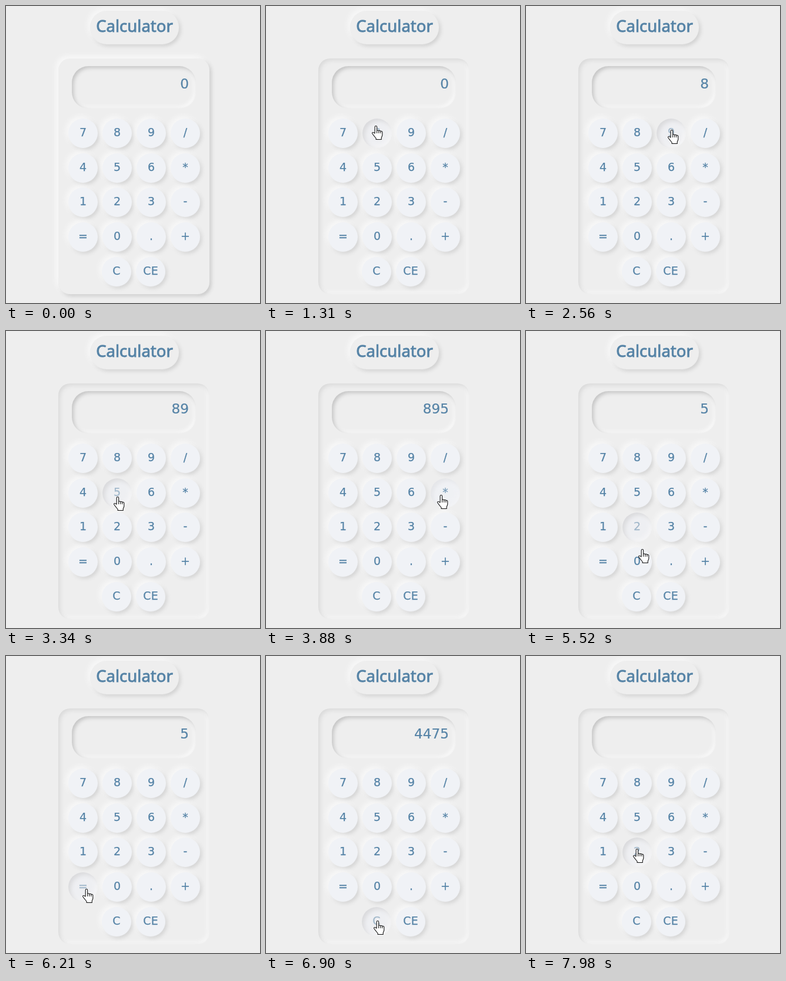
Animation of 432x504 px, one loop 8000 ms. Source, as an HTML page:

```html
<!DOCTYPE html>
<html lang="en">
<head>
<meta charset="utf-8">
<title>Calculator</title>
<style>
html, body { margin: 0; width: 100%; height: 100%; overflow: hidden; background: #eee; }
body { position: relative; font-family: "DejaVu Sans", sans-serif; color: #5583a6; }
body * { position: absolute; box-sizing: border-box; }
.title {
  left: 143px; top: 8px; width: 151px; height: 57px; border-radius: 28px;
  font: 27.5px/52px "Noto Sans", sans-serif; text-align: center;
  -webkit-text-stroke: .9px;
  box-shadow: -4px -4px 8px #f8f8f8, 3px 3px 6px #cfcfcf;
}
.card {
  left: 89px; top: 89px; width: 257px; height: 400px; border-radius: 20px;
  box-shadow: -4px -4px 8px #f9f9f9, 3px 3px 6px #c8c8c8;
}
.card.over { box-shadow: inset 3px 3px 7px #d9d9d9, inset -3px -3px 7px #f8f8f8; }
.screen {
  left: 112px; top: 102px; width: 211px; height: 72px; border-radius: 28px;
  padding-right: 12px; font-size: 23.2px; line-height: 60px; text-align: right;
  -webkit-text-stroke: .2px;
  box-shadow: inset 3px 3px 6px #c4c4c4, inset -3px -3px 6px #fafafa;
}
.key {
  width: 50px; height: 50px; border-radius: 50%; background: #f0f2f6;
  font-size: 19px; line-height: 46px; text-align: center;
  -webkit-text-stroke: .25px;
  box-shadow: -4px -4px 8px #f8f8f8, 3px 3px 6px #d3d3d3;
}
.key.over { box-shadow: none; }
.key i {
  inset: 0; border-radius: 50%; opacity: 0; background: #eeeef080;
  box-shadow: inset 4px 4px 7px #dadadc, inset -4px -4px 7px #f5f5f6;
}
svg { left: 0; top: 0; overflow: visible; fill: #fff; stroke: #111; stroke-linejoin: round; }
</style>
</head>
<body>
<div class="title">Calculator</div>
<div class="card"></div>
<div class="screen"></div>
<svg id="hand" width="19" height="25"><path transform="scale(1.08 1)" d="M4.8 13V2.2a1.6 1.6 0 0 1 3.2 0V8.7c.4-1.2 2.8-1 3 .4c.5-1 2.6-.8 2.8.7c.5-.8 2.7-.5 2.7 1.2V16c0 2-1.5 3.3-1.5 5v2.4H6.6V21.5C5 19.5 2.5 16.5 .8 13.6c-1-1.8 1-2.9 2.3-1.6zM8 8.7V13M11 9.1V13M13.8 9.8V13"/></svg>
<svg id="arrow" width="13" height="20"><path d="M.5 .5V16.5L4.2 13L6.7 18.6L9 17.6L6.6 12H11.8z"/></svg>
<script>
const LOOP = 8000, ENTER = 150, LAG = 70, FADE = 50, RADIUS = 25;

const $ = s => document.querySelector(s);
const card = $(".card"), screen = $(".screen"), hand = $("#hand"), arrow = $("#arrow");

function addKey(label, x, y) {
  const el = document.createElement("div");
  el.className = "key";
  el.style.left = x - RADIUS + "px";
  el.style.top = y - RADIUS + "px";
  el.textContent = label;
  const dent = el.appendChild(document.createElement("i"));
  hand.before(el);
  return { label, el, dent, x, y };
}
const keys = [..."789/456*123-=0.+"].map((c, i) =>
  addKey(c, 131 + 58 * (i % 4), 216 + Math.round(58.7 * (i >> 2))));
keys.push(addKey("C", 188, 451), addKey("CE", 246, 451));

// One visit of the pointer to a key; a reading appears as it leaves
function visit(label, at, leave = at, dx = 0, dy = 0, reading) {
  const key = keys.find(k => k.label === label);
  return { at, leave, x: key.x + dx, y: key.y + dy, reading };
}
const visits = [
  { at: 0, leave: ENTER, x: 352, y: 492, reading: "0" },
  visit("8", 930, 2240, -3, -13, "8"),
  visit("9", 2480, 2640, 0, -6, "89"),
  visit("5", 3030, 3420, 0, 6, "895"),
  visit("*", 3880, 4190, -8, 3),
  visit("3", 4650, 4650, -16, 12),
  visit("2", 4970),
  visit("5", 5160, 5280, 0, 6, "5"),
  visit("0", 5520, 5520, 8, -22),
  visit("=", 5980, 6300, 5, 3, "4475"),
  visit("C", 6850, 7130, 1, -2, ""),
  visit("C", 7140, 7440, 1, -2),
  visit("2", LOOP - 20, LOOP, -1, -6)
];

const ease = k => k * k * (3 - 2 * k);

function pointer(t) {
  if (t < ENTER) return null;
  const i = visits.findIndex(v => v.leave > t);
  const b = visits[i], a = visits[i - 1];
  const k = ease(Math.min(1, (t - a.leave) / (b.at - a.leave)));
  return { x: a.x + (b.x - a.x) * k, y: a.y + (b.y - a.y) * k };
}

const hits = (key, p) => p && Math.hypot(p.x - key.x, p.y - key.y) < RADIUS;

function reading(t) {
  return visits.filter((v, i) => v.reading !== undefined && (!i || v.leave <= t)).pop().reading;
}

function place(el, show, x, y) {
  el.style.display = show ? "block" : "none";
  el.style.transform = `translate(${Math.round(x)}px, ${Math.round(y)}px)`;
}

function draw(t) {
  const p = pointer(t), late = pointer(t - LAG), later = pointer(t - LAG - FADE);
  card.classList.toggle("over", !!late);
  for (const key of keys) {
    const over = hits(key, late);
    key.el.classList.toggle("over", !!over);
    key.dent.style.opacity = !over ? 0 : hits(key, later) ? 1 : .5;
  }
  screen.textContent = reading(t);
  const onKey = keys.some(key => hits(key, p));
  const { x, y } = p || visits[0];
  place(hand, p && onKey, x - 6, y);
  place(arrow, p && !onKey, x, y);
}

function tick() {
  draw(performance.now() % LOOP);
  requestAnimationFrame(tick);
}
tick();
</script>
</body>
</html>
```
